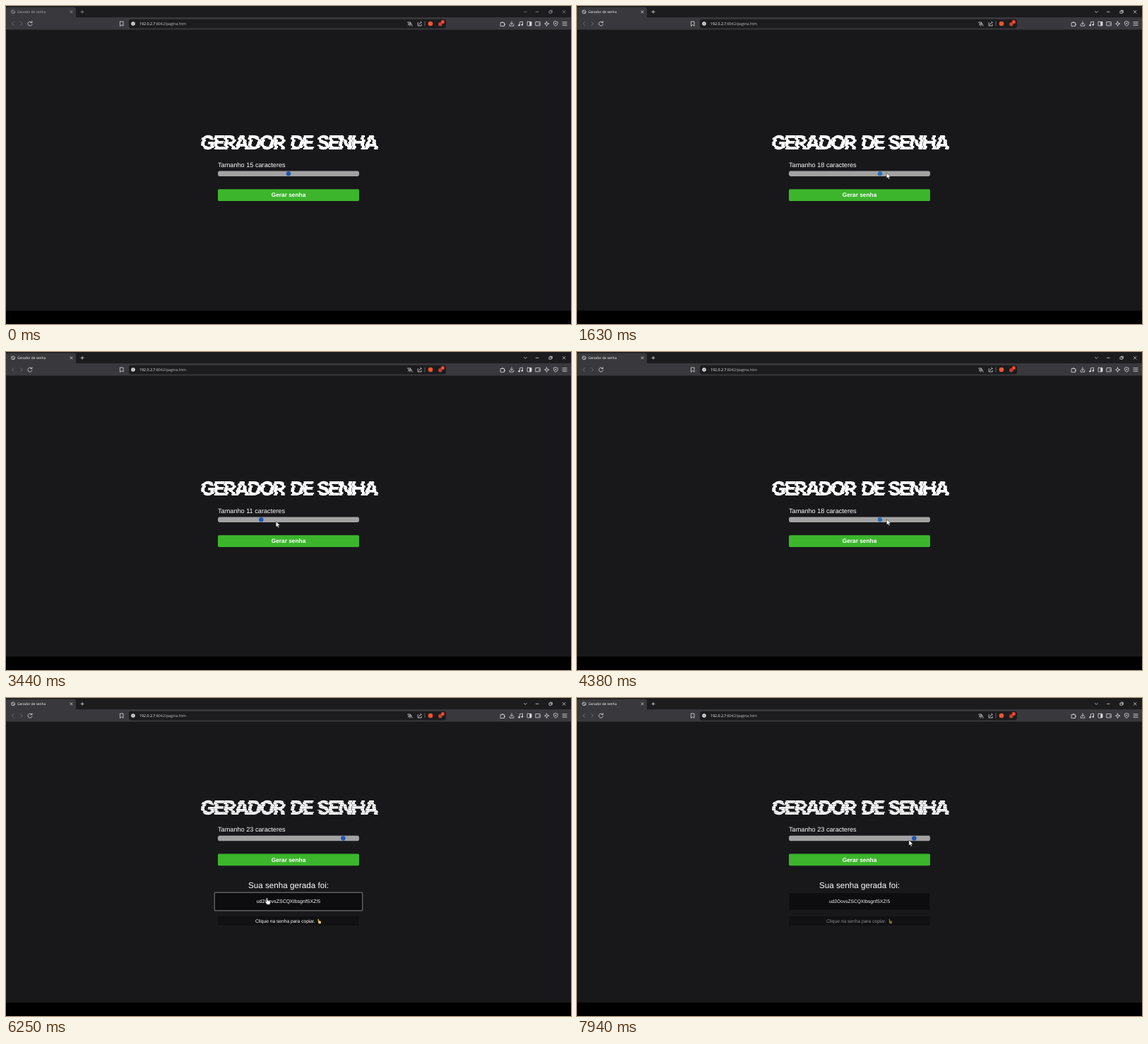
These frames come from a looping animation (800 by 450 pixels, 8000 ms). An HTML page:

```html
<!DOCTYPE html>
<html lang="pt">
<head>
<meta charset="utf-8">
<title>Gerador de senha</title>
<style>
html, body { margin: 0; width: 100%; height: 100%; overflow: hidden; background: #000; }
svg { display: block; width: 100vw; height: 100vh; }
text { fill: #fff; font-family: "Liberation Sans", Arial, sans-serif; text-rendering: geometricPrecision; }
.ui { font-family: "Open Sans", "Noto Sans", sans-serif; }
.mid { text-anchor: middle; }
.title { font: 800 27.5px Inter, sans-serif; letter-spacing: -2.6px; }
.line { fill: none; stroke: #dcdce0; stroke-width: .8; stroke-linecap: round; stroke-linejoin: round; }
.solid { fill: #dcdce0; }
.off { stroke: #77777c; }
</style>
</head>
<body>
<svg viewBox="0 0 800 450">
  <defs>
    <g id="heading">
      <text class="title" x="275.5" y="203.3">GERADOR</text>
      <text class="title" x="402.5" y="203.3">DE</text>
      <text class="title" x="440.5" y="203.3">SENHA</text>
    </g>
  </defs>
  <rect width="800" height="431" fill="#18181a"/>
  <rect width="800" height="17" fill="#1c1c1f"/>
  <rect y="16" width="800" height="17.5" fill="#39393d"/>
  <rect y="1.5" width="99" height="18" rx="3" fill="#39393d"/>
  <rect x="174" y="18.8" width="449" height="12.6" rx="3" fill="#1c1c1f"/>

  <g id="frame">
    <circle class="line" cx="10" cy="8.3" r="2.5"/>
    <path class="line" d="M8.500 7l3 3"/>
    <text class="ui" x="16" y="10.2" font-size="4.8">Gerador de senha</text>
    <path class="line" d="M91 6.800l3 3m0-3l-3 3M106 8.300h4m-2-2v4"/>
    <path class="line" d="M733.500 7.500l1.800 1.800 1.800-1.800M750.300 8.300h3.600M788.300 6.500l3.600 3.600m0-3.600l-3.600 3.600"/>
    <path class="line" d="M769.300 7.200h3v3h-3zM770.300 6.200h3v3"/>
  </g>

  <path class="line off" d="M11 22.500l-2.500 2.500 2.500 2.500M20.500 22.500l2.500 2.500-2.500 2.500"/>
  <path class="line" d="M36.300 23.200a3 3 0 1 0 .6 2.600M36.900 21.600v2h-2"/>
  <path class="line" d="M161.800 22h4.200v6.300l-2.100-1.800-2.100 1.800z"/>
  <circle cx="180" cy="25" r="2.7" fill="#e8e8ea"/>
  <path d="M180 23.400v3.200" stroke="#1c1c1f" stroke-width=".7"/>
  <text class="ui" x="189" y="27" font-size="5.3">192.0.2.7<tspan fill="#c4c4c8">:8042/pagina.htm</tspan></text>
  <path class="line" d="M568.800 23h4q-.5 3-3.500 4m0-3l2 2M571.700 28.200l1.700-4 1.700 4"/>
  <path class="line" d="M583.200 23.500v4.500h5v-1.700M585 26q.3-2.500 3.500-2.500l-1.500-1.500"/>
  <path class="line off" d="M593 22v6"/>
  <circle cx="601" cy="25" r="3.3" fill="#f0562b"/>
  <circle cx="614.800" cy="25.800" r="2.700" fill="#c9402f"/>
  <circle cx="618.400" cy="22.500" r="2.700" fill="#e0301e"/>
  <text class="ui mid" x="618.4" y="23.9" font-size="3.8">2</text>

  <path class="line" d="M700.500 23.500h5v5h-5zM702 23q1-2 2 0M706 25q2 1 0 2"/>
  <path class="line" d="M716 21.800v4m-1.700-1.600l1.700 1.700 1.700-1.700M713.200 26v2.200h5.600V26"/>
  <path class="line" d="M727.300 27.300v-4.500l4.200-.8v4.500"/>
  <circle class="solid" cx="726.500" cy="27.300" r="1.200"/>
  <circle class="solid" cx="730.700" cy="26.500" r="1.200"/>
  <rect class="line" x="738" y="22.300" width="6" height="5.600" rx=".6"/>
  <rect class="solid" x="741.300" y="22.300" width="2.700" height="5.600"/>
  <path class="line" d="M750.200 22.500h6v5.300h-6zM754 25.300h2"/>
  <path class="line" d="M765.500 22l1 2.500 2.500 .5-2.500 1-1 2.500-1-2.500-2-1 2-.5z"/>
  <path class="line" d="M778.300 21.700l2.800 1v2.200q-.3 2.300-2.800 3.500-2.500-1.200-2.800-3.500v-2.200z"/>
  <circle class="solid" cx="778.300" cy="24.700" r=".9"/>
  <path class="line" d="M788 22.700h6M788 25h6M788 27.300h6"/>

  <g id="panel">
    <g id="slices"></g>
    <text id="label" x="300" y="227.6" font-size="9.17"></text>
    <rect x="300" y="233.5" width="200" height="7.5" rx="2.4" fill="#a2a2a2"/>
    <circle id="thumb" cy="237.2" r="3.2"/>
    <rect x="300" y="259.2" width="200" height="16.7" rx="1.7" fill="#3cb52c"/>
    <text class="mid" x="400" y="270.3" font-size="8.33" font-weight="bold">Gerar senha</text>
  </g>

  <g id="result">
    <text class="mid" x="400" y="269.2" font-size="11.67">Sua senha gerada foi:</text>
    <g id="box">
      <rect id="field" x="300.2" y="275.8" width="199.6" height="24.5" rx=".8" fill="#0d0d0f" stroke-width=".5"/>
      <text class="mid" x="400" y="290.2" font-size="6.67">ud2OovsZSCQXIbsgnfSXZ!5</text>
    </g>
    <rect x="300" y="309" width="200" height="13" rx="1.7" fill="#111113"/>
    <g id="tip">
      <text x="353" y="318.3" font-size="6.67">Clique na senha para copiar.</text>
      <g fill="#ecc95c">
        <rect x="441.800" y="312.800" width="1.400" height="4.500" rx=".7" transform="rotate(-12 442 315)"/>
        <rect x="442.200" y="315.500" width="3.800" height="3.800" rx="1.200"/>
      </g>
    </g>
  </g>

  <g id="cursor" stroke="#111" stroke-width=".5" stroke-linejoin="round" fill="#fff">
    <path id="arrow" d="M0 0V8L1.900 6.300 3.100 9 4.500 8.400 3.300 5.800H5.800Z"/>
    <path id="hand" d="M-.9.600Q0-.5.900.6V3.500L4 4.100Q5 4.500 4.900 5.500L4.300 9.200H-.1L-2.600 5.300Q-2.500 4.200-.9 5.200Z"/>
  </g>
</svg>
<script>
const LOOP = 8000, STEP = LOOP / 128, LAG = 30;
const ENTER = 60, GENERATE = 5600, HOVER_ON = 5800, HOVER_OFF = 7350, FADE = 200;
const SHIFT = 38.7, MIN = 5, MAX = 25, TRACK_START = 303.3, UNIT = 9.67;
const DRAGS = [[1060, 3250], [4250, 4880]];
const TURNS = [ // where the pointer rests or turns: time, x, y
  [60, 560, 236], [880, 390, 193], [1060, 400, 236], [1250, 316, 236], [1840, 489, 236],
  [2778, 304, 237], [3250, 366, 236], [4060, 494, 265], [4250, 424, 237], [4650, 489, 236],
  [4880, 477, 237], [5650, 444, 272], [6700, 322, 290], [7060, 407, 284], [7400, 425, 275],
  [7650, 450, 160], [7940, 470, 201]
];

const $ = id => document.getElementById(id);
const set = (id, name, value) => $(id).setAttribute(name, value);
const show = (id, on) => set(id, 'visibility', on ? 'inherit' : 'hidden');
const clamp = (v, lo, hi) => Math.min(hi, Math.max(lo, v));
const mix = (a, b, k) => a + (b - a) * k;
const ease = k => (1 - Math.cos(Math.PI * clamp(k, 0, 1))) / 2;

// The heading is cut into thin bands, pushed sideways most near its middle.
function sliceHeading(top = 180, height = 3, count = 9) {
  let html = '';
  for (let i = 0; i < count; i++) {
    const dx = 1.3 * Math.sin(i * 2.4) * Math.sin(Math.PI * i / (count - 1));
    html += `<clipPath id="band${i}"><rect x="260" y="${top + i * height}" width="280" height="${height}"/></clipPath>
      <g clip-path="url(#band${i})"><use href="#heading" x="${dx}"/></g>`;
  }
  $('slices').innerHTML = html;
}

function pointer(t) {
  const next = TURNS.findIndex(p => p[0] > t);
  const i = next < 0 ? TURNS.length - 1 : Math.max(1, next);
  const [a, b] = [TURNS[i - 1], TURNS[i]];
  const k = ease((t - a[0]) / (b[0] - a[0]));
  return [mix(a[1], b[1], k), mix(a[2], b[2], k)];
}

function passwordLength(t) {
  const drag = DRAGS.filter(d => t >= d[0]).pop();
  if (!drag) return 15;
  const [x] = pointer(clamp(t - LAG, ...drag));
  return clamp(Math.round(MIN + (x - TRACK_START) / UNIT), MIN, MAX);
}

function draw(t) {
  const [x, y] = pointer(t);
  const size = passwordLength(t), done = t >= GENERATE;
  const hover = ease((t - HOVER_ON) / FADE) - ease((t - HOVER_OFF) / FADE);
  const dragging = DRAGS.some(d => t >= d[0] && t <= d[1]);
  // The hand stays until the pointer moves on after the click.
  const buttonTop = 259.2 - (t > HOVER_ON ? SHIFT : 0);
  const overButton = x > 300 && x < 500 && y > buttonTop && y < buttonTop + 16.7;
  const hand = overButton || (t >= HOVER_ON && t < HOVER_OFF);

  set('frame', 'opacity', t < ENTER ? .6 : 1);
  set('panel', 'transform', `translate(0 ${done ? -SHIFT : 0})`);
  $('label').textContent = `Tamanho ${size} caracteres`;
  set('thumb', 'cx', TRACK_START + (size - MIN) * UNIT);
  set('thumb', 'fill', dragging ? '#2a6fbd' : '#2156b4');

  show('result', done);
  set('box', 'transform', `translate(400 288) scale(${1 + .05 * hover}) translate(-400 -288)`);
  const edge = Math.round(mix(32, 235, hover));
  set('field', 'stroke', `rgb(${edge},${edge},${edge})`);
  set('tip', 'opacity', mix(.52, 1, hover));

  show('cursor', t >= ENTER);
  show('arrow', !hand);
  show('hand', hand);
  set('cursor', 'transform', `translate(${x} ${y})`);
}

function tick() {
  const t = performance.now() % LOOP;
  draw(Math.floor((t + 6) / STEP) % 128 * STEP);
  requestAnimationFrame(tick);
}
sliceHeading();
tick();
</script>
</body>
</html>
```
